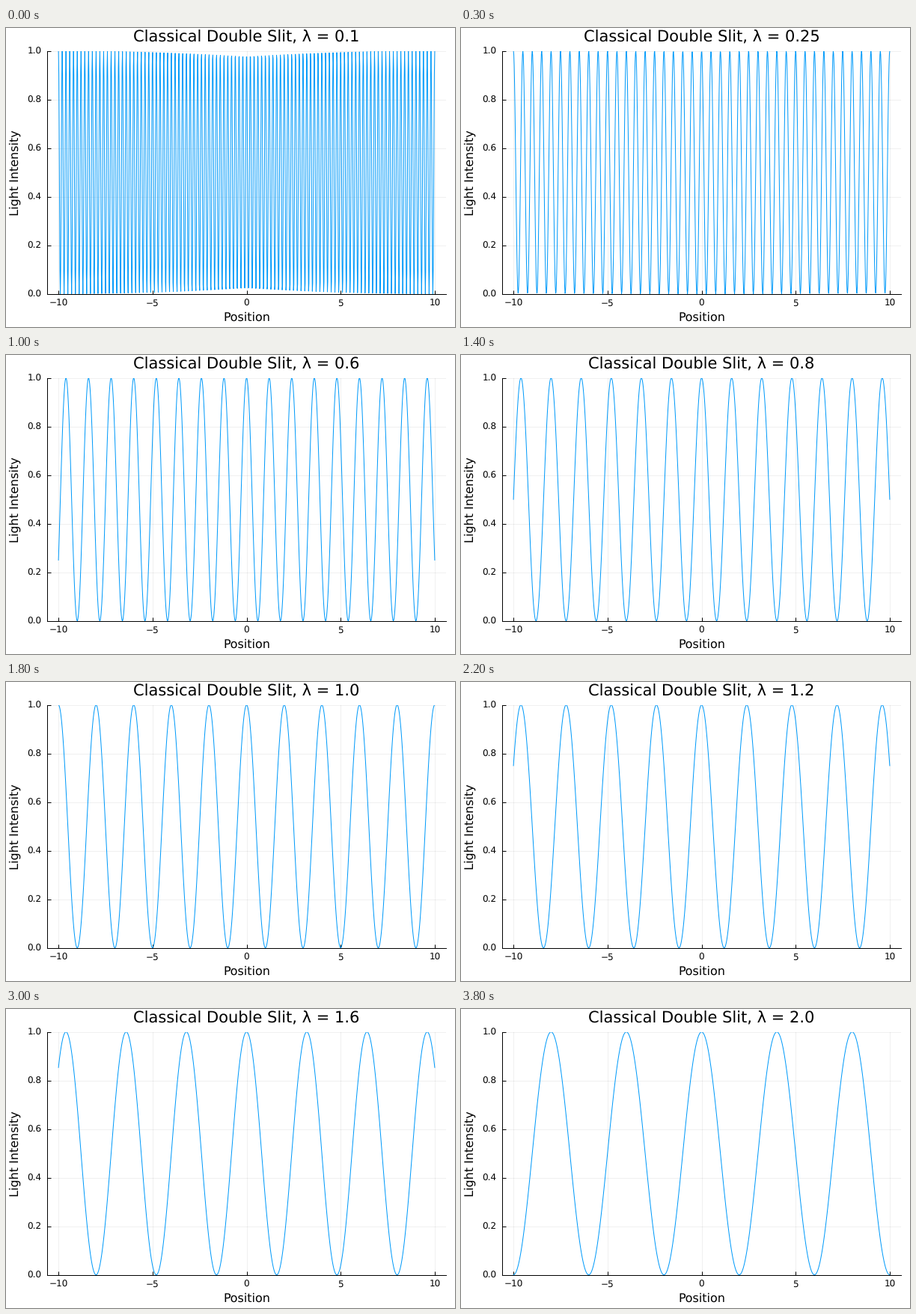
Recreate the animation shown at these times as a matplotlib script. Size 600 by 400 pixels, loop 3900 ms.

```python
import numpy as np
import matplotlib.pyplot as plt
from matplotlib.animation import FuncAnimation

W, H, DPI = 600, 400, 100
PX = 72 / DPI  # one pixel in points
LEFT, RIGHT, TOP, BOTTOM = 55, 588, 30.7, 355.6
FRAMES, INTERVAL = 39, 100

plt.rcParams.update({
    "font.family": "DejaVu Sans",
    "text.hinting": "none",
    "text.hinting_factor": 1,
    "path.simplify": False,
})

fig = plt.figure(figsize=(W / DPI, H / DPI), dpi=DPI, facecolor="white")
ax = fig.add_axes([LEFT / W, 1 - BOTTOM / H, (RIGHT - LEFT) / W, (BOTTOM - TOP) / H])
ax.set(xlim=(-10.6, 10.6), ylim=(0, 1))


def label(x, y, text, size, **kw):
    """Place text at pixel coordinates measured from the top left."""
    kw = {"ha": "center", "va": "baseline", "rotation_mode": "anchor", **kw}
    return fig.text(x / W, 1 - y / H, text, fontsize=size * PX, **kw)


def to_pixels(x, y):
    px = LEFT + (x + 10.6) / 21.2 * (RIGHT - LEFT)
    return px, BOTTOM - y * (BOTTOM - TOP)


x_ticks = [-10, -5, 0, 5, 10]
y_ticks = [0, 0.2, 0.4, 0.6, 0.8, 1]
ax.set_xticks(x_ticks)
ax.set_yticks(y_ticks)
ax.tick_params(direction="in", length=5 * PX, width=PX,
               labelbottom=False, labelleft=False)
ax.grid(color="black", alpha=0.06, linewidth=PX)
ax.set_axisbelow(True)
for side in ("top", "right"):
    ax.spines[side].set_visible(False)
for side in ("left", "bottom"):
    ax.spines[side].set(linewidth=PX, zorder=1.5)

for tick in x_ticks:
    label(to_pixels(tick, 0)[0], 371.5, str(tick).replace("-", "\u2212"), 11.9)
for tick in y_ticks:
    label(47.5, to_pixels(0, tick)[1] + 4.4, f"{tick:.1f}", 11.9, ha="right")

label(321.5, 392, "Position", 16.3)
label(16.3, 193.3, "Light Intensity", 16.3, rotation=90)
title = label(321.5, 18.6, "", 20.8)

# The sample count matters: it shapes the envelope at short wavelengths.
position = np.linspace(-10, 10, 1000)
curve, = ax.plot([], [], color="#009AFA", linewidth=PX, zorder=3)


def draw(frame):
    wavelength = round(0.1 + 0.05 * frame, 2)
    curve.set_data(position, np.cos(np.pi * position / (2 * wavelength)) ** 2)
    title.set_text(f"Classical Double Slit, λ = {wavelength}")
    return curve, title


anim = FuncAnimation(fig, draw, frames=FRAMES, interval=INTERVAL,
                     repeat=True, repeat_delay=0)
plt.show()
```
